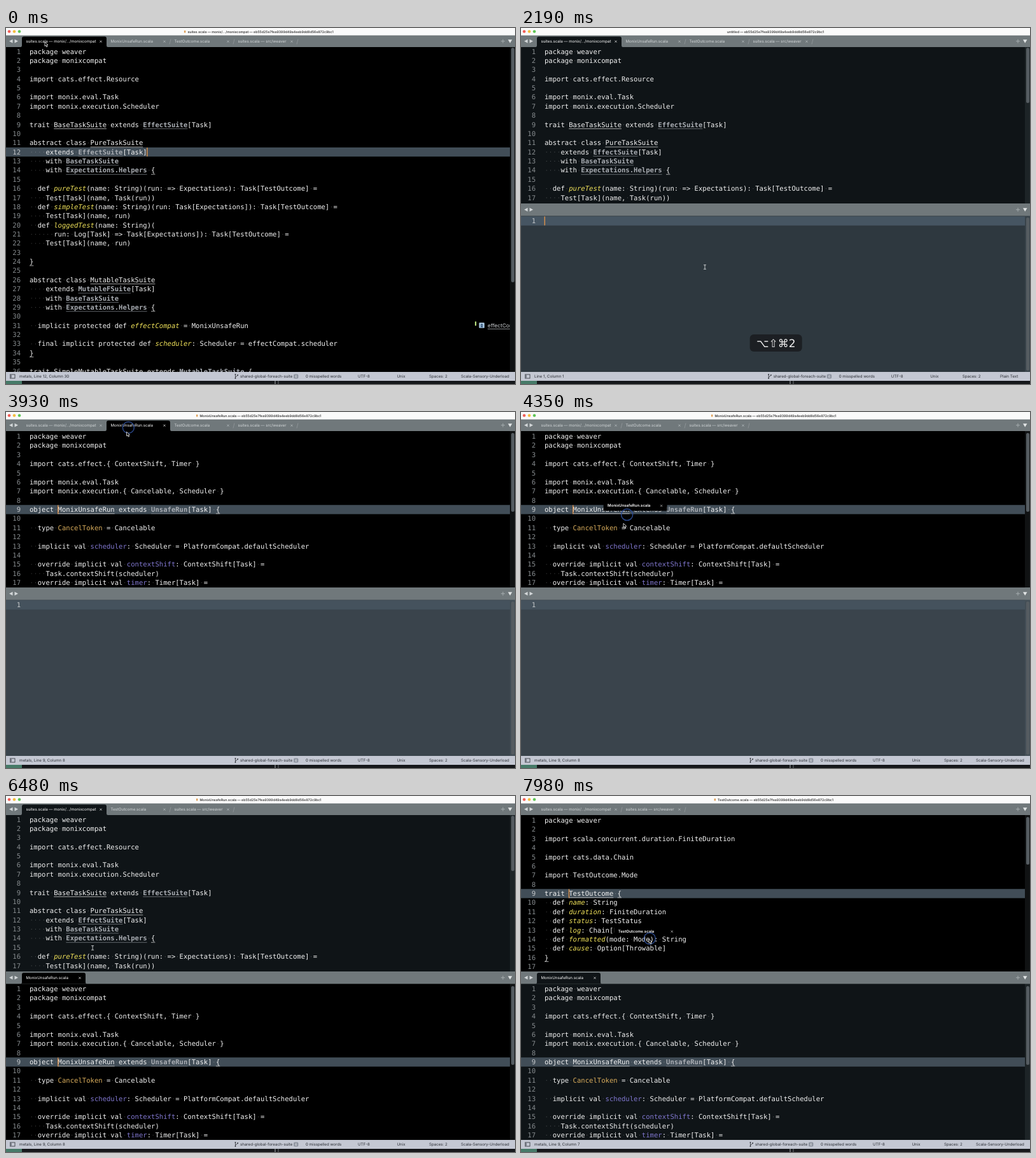
An HTML page with a canvas that plays this animation: 800x560 px, repeating every 8000 ms.

```html
<!DOCTYPE html>
<html lang="en">
<head>
<meta charset="utf-8">
<title>Editor panes</title>
<style>
html, body { margin: 0; width: 100%; height: 100%; overflow: hidden; background: #000; }
canvas { display: block; width: 800px; height: 560px; }
</style>
</head>
<body>
<canvas id="stage" width="800" height="560"></canvas>
<script>
const ctx = document.getElementById('stage').getContext('2d');
const LOOP = 8000, CHAR = 6.368, LINE = 14.37, LEFT = 37;
const MONO = '"DejaVu Sans Mono", monospace', UI = 'Inter, sans-serif';
const HASH = 'eb55d25e7fea9399d49a4eeb9dd8d56e872c9bc1';
const BAR = '#70787b', ROW = '#414d57', DIM = '#0f1417', CARET = '#e8964a';

// Inline marks: _underlined_  *type*  ~method~  ^value^  $alias$
const STYLES = {
  _: { color: '#f2f2f2', line: '#c8c8c8' },
  '*': { color: '#a9adb3', line: '#777c82', font: 'bold ' },
  '~': { color: '#f0e25a', font: 'italic ' },
  '^': { color: '#8077cf' },
  $: { color: '#d9ad5c' },
};
const PLAIN = { color: '#f2f2f2' };

const SUITES = `package weaver
package monixcompat

import cats.effect.Resource

import monix.eval.Task
import monix.execution.Scheduler

trait _BaseTaskSuite_ extends *EffectSuite*[Task]

abstract class _PureTaskSuite_
    extends *EffectSuite*[Task]
    with *BaseTaskSuite*
    with *Expectations.Helpers* _{_

  def ~pureTest~(name: String)(run: => Expectations): Task[TestOutcome] =
    Test[Task](name, Task(run))
  def ~simpleTest~(name: String)(run: Task[Expectations]): Task[TestOutcome] =
    Test[Task](name, run)
  def ~loggedTest~(name: String)(
      run: Log[Task] => Task[Expectations]): Task[TestOutcome] =
    Test[Task](name, run)

_}_

abstract class _MutableTaskSuite_
    extends *MutableFSuite*[Task]
    with *BaseTaskSuite*
    with *Expectations.Helpers* _{_

  implicit protected def ~effectCompat~ = MonixUnsafeRun

  final implicit protected def ~scheduler~: Scheduler = effectCompat.scheduler
_}_

trait _SimpleMutableTaskSuite_ extends *MutableTaskSuite* _{_`.split('\n');

const UNSAFE = `package weaver
package monixcompat

import cats.effect.{ ContextShift, Timer }

import monix.eval.Task
import monix.execution.{ Cancelable, Scheduler }

object _MonixUnsafeRun_ extends *UnsafeRun*[Task] _{_

  type $CancelToken$ = Cancelable

  implicit val ^scheduler^: Scheduler = PlatformCompat.defaultScheduler

  override implicit val ^contextShift^: ContextShift[Task] =
    Task.contextShift(scheduler)
  override implicit val ^timer^: Timer[Task] =`.split('\n');

const OUTCOME = `package weaver

import scala.concurrent.duration.FiniteDuration

import cats.data.Chain

import TestOutcome.Mode

trait _TestOutcome_ _{_
  def ~name~: String
  def ~duration~: FiniteDuration
  def ~status~: TestStatus
  def ~log~: Chain[Log.Entry]
  def ~formatted~(mode: Mode): String
  def ~cause~: Option[Throwable]
_}_
`.split('\n');

const TAB = {
  suites: { label: 'suites.scala — monix/.../monixcompat', w: 133 },
  unsafe: { label: 'MonixUnsafeRun.scala', w: 100 },
  outcome: { label: 'TestOutcome.scala', w: 100 },
  weaver: { label: 'suites.scala — src/weaver', w: 100 },
};

// Event times in ms
const AT = { click: 1080, keys: 1500, split: 2130, fade: 2750, gone: 3350,
  pick1: 3700, drop1: 5700, pick2: 7150 };

const PATH = [
  [0, 62, 25], [200, 62, 25], [950, 289, 376], [3200, 289, 376], [3620, 194, 21],
  [3830, 193, 22], [4350, 162, 178], [4850, 108, 276], [5370, 69, 289],
  [5820, 64, 289], [6480, 136, 239], [7000, 213, 22], [7250, 214, 22], [7980, 202, 228],
];

const slope = (i, k) => i < 0 || i >= PATH.length - 1 ? 0
  : (PATH[i + 1][k] - PATH[i][k]) / (PATH[i + 1][0] - PATH[i][0]);
function tangent(i, k) {
  const a = slope(i - 1, k), b = slope(i, k);
  return a * b > 0 ? 2 * a * b / (a + b) : 0;
}
function pointer(t) {
  t = Math.min(Math.max(t, 0), PATH[PATH.length - 1][0]);
  let i = 0;
  while (i < PATH.length - 2 && t > PATH[i + 1][0]) i++;
  const h = PATH[i + 1][0] - PATH[i][0], u = (t - PATH[i][0]) / h;
  const at = k => {
    const e = u * u * (3 - 2 * u);
    return PATH[i][k] * (1 - e) + PATH[i + 1][k] * e +
      h * (tangent(i, k) * u * (1 - u) ** 2 - tangent(i + 1, k) * u * u * (1 - u));
  };
  return { x: at(1), y: at(2) };
}

function rect(x, y, w, h, color) {
  ctx.fillStyle = color;
  ctx.fillRect(x, y, w, h);
}
function roundRect(x, y, w, h, r, color) {
  ctx.fillStyle = color;
  ctx.beginPath();
  ctx.roundRect(x, y, w, h, r);
  ctx.fill();
}
function shape(points, color) {
  ctx.fillStyle = color;
  ctx.beginPath();
  points.forEach(([x, y]) => ctx.lineTo(x, y));
  ctx.closePath();
  ctx.fill();
}
function stroke(points, color, width = 1) {
  ctx.strokeStyle = color;
  ctx.lineWidth = width;
  ctx.beginPath();
  points.forEach(([x, y], i) => i % 2 ? ctx.lineTo(x, y) : ctx.moveTo(x, y));
  ctx.stroke();
}
function text(s, x, y, font, color, align = 'left') {
  ctx.font = font;
  ctx.fillStyle = color;
  ctx.textAlign = align;
  ctx.fillText(s, x, y);
}
function disc(x, y, r, color) {
  ctx.fillStyle = color;
  ctx.beginPath();
  ctx.arc(x, y, r, 0, 7);
  ctx.fill();
}

function codeLine(line, y) {
  let col = 0, style = PLAIN;
  for (const part of line.split(/([_*~^$]|\s)/)) {
    if (STYLES[part]) {
      style = style === PLAIN ? STYLES[part] : PLAIN;
    } else if (part === ' ') {
      rect(LEFT + (col + 0.42) * CHAR, y - 0.4, 1, 1, 'rgba(255,255,255,.3)');
      col++;
    } else if (part) {
      const x = LEFT + col * CHAR;
      text(part, x, y + 3.6, (style.font || '') + '10.58px ' + MONO, style.color);
      if (style.line) rect(x, y + 6, part.length * CHAR, 0.8, style.line);
      col += part.length;
    }
  }
}

function pane({ top, bottom, first, lines, bg, row, col, rowColor = ROW, thumb }) {
  ctx.save();
  ctx.beginPath();
  ctx.rect(0, top, 800, bottom - top);
  ctx.clip();
  rect(0, top, 800, bottom - top, bg);
  if (row) rect(0, first + (row - 1) * LINE - 7.2, 792, 14.4, rowColor);
  lines.forEach((line, i) => {
    const y = first + i * LINE;
    text(i + 1, 23, y + 3.6, '10.58px ' + MONO, i + 1 === row ? '#c3c7ca' : '#868b8e', 'right');
    codeLine(line, y);
  });
  if (col) rect(LEFT + (col - 1) * CHAR - 0.4, first + (row - 1) * LINE - 7, 1.3, 14, CARET);
  rect(792, top, 8, bottom - top, 'rgba(130,145,155,.12)');
  roundRect(794, thumb[0], 5, thumb[1] - thumb[0], 2.5, '#555c61');
  ctx.restore();
}

function cross(x, y, color) {
  stroke([[x - 1.6, y - 1.6], [x + 1.6, y + 1.6], [x + 1.6, y - 1.6], [x - 1.6, y + 1.6]], color, 0.8);
}
function tabShape(x, y, w, h, color) {
  ctx.fillStyle = color;
  ctx.beginPath();
  ctx.moveTo(x - 2, y + h);
  ctx.quadraticCurveTo(x, y + h, x, y + h - 3);
  ctx.lineTo(x, y + 3);
  ctx.quadraticCurveTo(x, y, x + 3, y);
  ctx.lineTo(x + w - 3, y);
  ctx.quadraticCurveTo(x + w, y, x + w, y + 3);
  ctx.lineTo(x + w, y + h - 3);
  ctx.quadraticCurveTo(x + w, y + h, x + w + 2, y + h);
  ctx.fill();
}
function tabBar(y, h, names, active, bg, startX = 25) {
  const mid = y + h / 2;
  rect(0, y, 800, h, BAR);
  shape([[5, mid], [10.5, mid - 3], [10.5, mid + 3]], '#d3d7d9');
  shape([[19, mid], [13.5, mid - 3], [13.5, mid + 3]], '#d3d7d9');
  stroke([[778, mid], [784, mid], [781, mid - 3], [781, mid + 3]], '#a4abae', 1);
  shape([[789, mid - 2.5], [795.5, mid - 2.5], [792.2, mid + 3]], '#e2e5e6');
  let x = startX;
  names.forEach((name, i) => {
    const { label, w } = TAB[name], on = name === active;
    if (on) tabShape(x, y + 2, w, h - 2, bg);
    else if (names[i + 1] !== active) stroke([[x + w - 1, y + 14], [x + w + 1, y + 6]], '#92999c', 0.8);
    text(label, x + 6.5, mid + 2.4, '6.15px ' + UI, on ? '#fff' : '#d2d6d8');
    cross(x + w - 9, mid + 0.5, on ? '#d8d8d8' : '#b4babd');
    x += w;
  });
}

function titleBar(title) {
  rect(0, 0, 800, 11.5, '#fafafa');
  ['#f25e57', '#f5bd3f', '#5ec454'].forEach((c, i) => disc(5 + i * 8, 5.5, 2.3, c));
  const s = title + ' — ' + HASH;
  text(s, 400, 7.5, '600 5.2px ' + UI, '#3c3c3c', 'center');
  if (title !== 'untitled') rect(397 - ctx.measureText(s).width / 2 - 2.5, 4, 2.5, 3.5, '#e0a35f');
}

function statusBar(where, plain) {
  const shift = plain ? 28.7 : 0, ink = '#2b2e35', y = 550.2, font = '6.17px ' + UI;
  rect(0, 541, 800, 14, '#c4c8d3');
  ctx.strokeStyle = ink;
  ctx.lineWidth = 0.8;
  ctx.strokeRect(6.5, 545, 7.5, 6);
  rect(6.5, 545, 2.5, 6, '#7b808a');
  text(where, 21, y, font, ink);
  const bx = 360.5 + shift;
  stroke([[bx, 545], [bx, 551], [bx, 549.5], [bx + 3.5, 546.5]], ink, 0.8);
  disc(bx, 545, 0.9, ink);
  disc(bx, 551, 0.9, ink);
  disc(bx + 3.7, 546, 0.9, ink);
  text('shared-global-foreach-suite', 368 + shift, y, font, ink);
  roundRect(452 + shift, 544.5, 7.5, 7, 2, '#8f95a1');
  text('6', 455.8 + shift, 549.9, '5px ' + UI, '#f4f5f7', 'center');
  text('0 misspelled words', 471 + shift, y, font, ink);
  text('UTF-8', 553 + shift, y, font, ink);
  text('Unix', 614.5 + shift, y, font, ink);
  text('Spaces: 2', 665 + shift, y, font, ink);
  text(plain ? 'Plain Text' : 'Scala-Sensory-Underload', plain ? 753 : 715, y, font, ink);
  rect(0, 555, 800, 5, '#15171a');
  rect(0, 555, 25, 5, '#467a68');
  rect(422.5, 555, 1, 5, '#a9adb0');
  rect(427.5, 555, 1, 5, '#6c7073');
}

function lens() {
  const y = 37 + 30 * LINE;
  roundRect(737, y - 6.5, 2.2, 7, 1, '#b5dc7c');
  roundRect(743.5, y - 4.5, 8.5, 8.5, 1, '#a9c6de');
  shape([[745, y], [747.8, y - 3], [750.5, y]], '#35567a');
  shape([[745, y + 3], [747.8, y], [750.5, y + 3]], '#35567a');
  ctx.save();
  ctx.beginPath();
  ctx.rect(740, y - 8, 52, 18);
  ctx.clip();
  text('effectCompat', 757, y + 2.9, '8.4px ' + UI, '#c9cccf');
  rect(757, y + 4.8, 35, 0.8, '#b0b4b7');
  ctx.restore();
}

function keyOverlay(t) {
  if (t < AT.keys || t > AT.gone) return;
  const full = t >= AT.split - 60, w = full ? 82 : 71;
  const out = Math.min(Math.max((t - AT.fade) / (AT.gone - AT.fade), 0), 1);
  ctx.globalAlpha = 1 - out;
  roundRect(400.7 - w / 2, 482, w, 27, 6, 'rgba(27,30,33,.92)');
  text(full ? '⌥⇧⌘2' : '⌥⇧⌘', 400.7, 501.5, '17px "DejaVu Sans", sans-serif', '#f0f0f0', 'center');
  ctx.globalAlpha = 1;
}

function dragTab(name, x, y) {
  rect(x, y, 100, 15, '#000');
  text(TAB[name].label, x + 6.5, y + 8.6, '600 6.05px ' + UI, '#fff');
  cross(x + 91, y + 7, '#b8b8b8');
}

function arrow({ x, y }) {
  const tip = [[0, 0], [0, 6.5], [1.6, 5.2], [2.8, 7.8], [4, 7.2], [2.9, 4.8], [4.9, 4.6]];
  const pts = tip.map(([a, b]) => [x + a - 1, y + b - 3]);
  shape(pts, '#000');
  ctx.lineWidth = 0.8;
  ctx.strokeStyle = '#fff';
  ctx.stroke();
}
function beam({ x, y }) {
  stroke([[x, y - 3], [x, y + 3], [x - 2, y - 3.3], [x + 2, y - 3.3], [x - 2, y + 3.3], [x + 2, y + 3.3]], '#d5d8da', 0.9);
}

function draw(t) {
  const p = pointer(t), ring = pointer(t - 60);
  const split = t >= AT.split;
  const dragging = t >= AT.pick1 && t < AT.drop1 ? 'unsafe' : t >= AT.pick2 ? 'outcome' : '';
  const away = dragging && ring.y > 35, docked = dragging === 'unsafe' && ring.y > 272;
  const placed = t >= AT.drop1;
  const focusTop = !split || dragging;

  let names = ['suites', 'unsafe', 'outcome', 'weaver'];
  if (placed) names = names.filter(n => n !== 'unsafe');
  if (away) names = names.filter(n => n !== dragging);
  const topBg = focusTop ? '#000' : DIM;

  if (!split) {
    const [row, col] = t < AT.click ? [12, 30] : [25, 1];
    pane({ top: 30, bottom: 541, first: 37, lines: SUITES, bg: '#000', row, col, thumb: [31, 400] });
    lens();
  } else {
    const top = { top: 30, bottom: 276, bg: topBg };
    if (dragging) {
      const un = dragging === 'unsafe';
      pane({ ...top, first: 38.5, lines: un ? UNSAFE : OUTCOME, row: 9, col: un ? 8 : 7,
        thumb: [33, un ? 157 : 108] });
    } else {
      pane({ ...top, first: 37, lines: SUITES, thumb: [31, 118] });
    }
    const low = { top: 295, bottom: 541, first: 303.5 };
    if (placed) {
      pane({ ...low, lines: UNSAFE, bg: focusTop ? DIM : '#000', row: 9, col: focusTop ? 0 : 8, thumb: [299, 423] });
    } else {
      pane({ ...low, lines: [''], bg: focusTop ? '#3a444c' : '#2e383f', row: 1, col: focusTop ? 0 : 1,
        rowColor: focusTop ? '#45525d' : '#465562', thumb: [298, 539] });
    }
    const lowTab = placed || docked ? ['unsafe'] : [];
    tabBar(276, 19.5, lowTab, 'unsafe', placed && focusTop ? DIM : '#000', docked ? ring.x - 33 : 25);
  }

  tabBar(11.5, 18.5, names, dragging || 'suites', topBg);
  const file = dragging ? TAB[dragging].label : placed ? TAB.unsafe.label : split ? 'untitled' : TAB.suites.label;
  titleBar(file);

  const plain = split && !dragging && !placed;
  const spot = !split ? (t < AT.click ? [12, 30] : [25, 1]) : plain ? [1, 1] : [9, dragging === 'outcome' ? 7 : 8];
  statusBar(`${plain ? '' : 'metals, '}Line ${spot[0]}, Column ${spot[1]}`, plain);
  keyOverlay(t);

  if (away && !docked) {
    const un = dragging === 'unsafe';
    dragTab(dragging, ring.x - (un ? 37 : 56), ring.y - (un ? 21 : 18));
  }
  if (dragging || (t >= AT.click && t < AT.click + 120)) {
    ctx.strokeStyle = 'rgba(45,78,150,.9)';
    ctx.lineWidth = 1.5;
    ctx.beginPath();
    ctx.arc(ring.x, ring.y, 9, 0, 7);
    ctx.stroke();
  }
  const overBar = p.y < 30 || (split && p.y > 275 && p.y < 296);
  (dragging || overBar ? arrow : beam)(p);
}

ctx.textRendering = 'geometricPrecision';
const start = performance.now();
function frame() {
  draw((performance.now() - start) % LOOP);
  requestAnimationFrame(frame);
}
frame();
</script>
</body>
</html>
```
